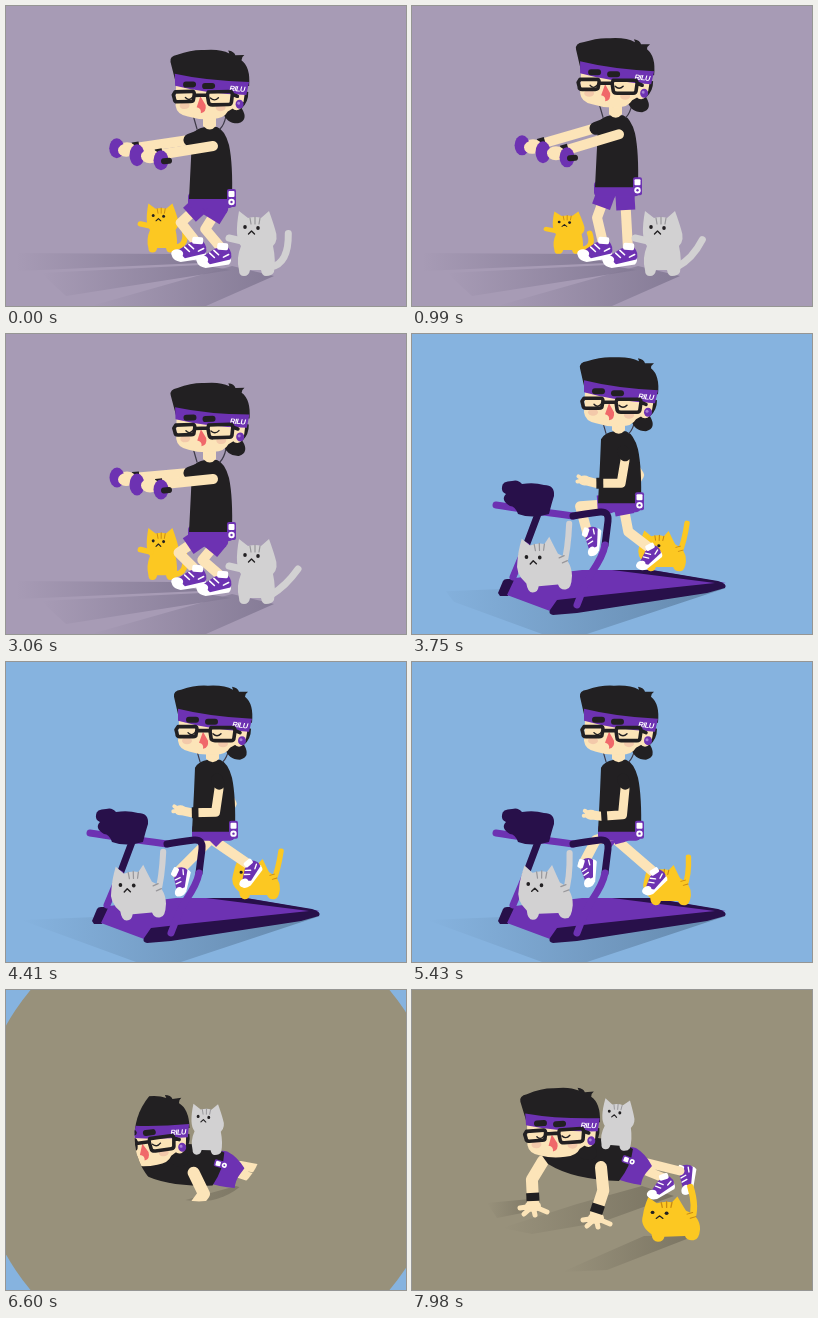
An HTML page that plays this animation: 400x300 px, repeating every 8 s.

```html
<!DOCTYPE html>
<html lang="en">
<head>
<meta charset="utf-8">
<title>Workout</title>
<style>
html, body { margin: 0; width: 100%; height: 100%; overflow: hidden; background: #a79bb5; }
svg { display: block; width: 100%; height: 100%; }
text { font: italic bold 7.5px "Liberation Sans", Arial, sans-serif; letter-spacing: -.5px; }
</style>
</head>
<body>
<svg id="stage" viewBox="0 0 400 300">
  <defs>
    <linearGradient id="g0"><stop offset="0" stop-color="#857b96" stop-opacity="0"/><stop offset="1" stop-color="#857b96"/></linearGradient>
    <linearGradient id="g1"><stop offset="0" stop-color="#6488ac" stop-opacity="0"/><stop offset="1" stop-color="#6488ac"/></linearGradient>
    <linearGradient id="g2"><stop offset="0" stop-color="#7a7462" stop-opacity="0"/><stop offset="1" stop-color="#7a7462"/></linearGradient>
    <clipPath id="c1"><circle id="r1" cx="193" cy="147"/></clipPath>
    <clipPath id="c2"><circle id="r2" cx="193" cy="147"/></clipPath>
  </defs>
  <rect width="400" height="300" fill="#a79bb5"/>
  <g id="s0"></g>
  <circle id="b1" cx="204" cy="150" fill="#86b3df"/>
  <g id="s1" clip-path="url(#c1)"></g>
  <circle id="b2" cx="204" cy="150" fill="#98917b"/>
  <g id="s2" clip-path="url(#c2)"></g>
</svg>
<script>
const SKIN = '#fce4b8', INK = '#222022', PURPLE = '#6d32b2', DARK = '#28104a',
      GREY = '#d2d1d2', GOLD = '#fcc822', WHITE = '#fff';
const LOOP = 8000, SPEED = 0.86, REVEAL = 197, STARTS = [0, 3329, 6329];
const $ = id => document.getElementById(id);
const TAU = Math.PI * 2;
const wave = u => Math.cos(u * TAU);

const fill = (d, c) => `<path d="${d}" fill="${c}"/>`;
const line = (d, c, w, cap = 'round') =>
  `<path d="${d}" fill="none" stroke="${c}" stroke-width="${w}" stroke-linecap="${cap}" stroke-linejoin="round"/>`;
const oval = (x, y, rx, ry, c) => `<ellipse cx="${x}" cy="${y}" rx="${rx}" ry="${ry}" fill="${c}"/>`;
const box = (x, y, w, h, r, c) => `<rect x="${x}" y="${y}" width="${w}" height="${h}" rx="${r}" fill="${c}"/>`;
const put = (x, y, body, rot = 0, sx = 1, sy = sx) =>
  `<g transform="translate(${x} ${y}) rotate(${rot}) scale(${sx} ${sy})">${body}</g>`;
const mix = (a, b, k) => [a[0] + (b[0] - a[0]) * k, a[1] + (b[1] - a[1]) * k];
const seg = (a, b) => `M${a}L${b}`;
const shade = (id, ...polys) => polys.map(p => fill(`M${p}Z`, `url(#g${id})`)).join('');

// Middle joint of a two-part limb; side picks the bending direction.
function joint(a, b, l1, l2, side) {
  const dx = b[0] - a[0], dy = b[1] - a[1], d = Math.hypot(dx, dy);
  const m = d >= l1 + l2 ? d * l1 / (l1 + l2) : (d * d + l1 * l1 - l2 * l2) / (2 * d);
  const h = Math.sqrt(Math.max(0, l1 * l1 - m * m)) * side * (d < l1 + l2);
  return [a[0] + (dx * m - dy * h) / d, a[1] + (dy * m + dx * h) / d];
}

const HEAD = [
  fill('M34-8L41-6Q41 4 34 10Q41 22 30 25Q18 25 15 13Z', INK),
  fill('M-31-14L-32 6Q-31 15-20 17Q-8 21 5 20Q16 20 20 13L36 4L38-8Z', SKIN),
  fill('M-31-16L-36-38Q-37-44-29-45Q-14-50-2-49Q14-50 23-45L22-48Q28-47 29-43L38-43Q35-41 35-38Q44-31 42-12Z', INK),
  fill('M-32-26Q0-18 42-16L39-3Q0-5-32-14Z', PURPLE),
  `<text x="30" y="-7" text-anchor="middle" fill="#fff" transform="rotate(6 30 -9)">RILU</text>`,
  oval(29, 4, 6.5, 8, SKIN), oval(32, 6, 4, 4.5, PURPLE), oval(31, 5, 1.5, 1.5, '#a77fd6'),
  oval(-23, 6, 5, 3.5, '#f3c9aa'), oval(13, 9, 5, 3.5, '#f3c9aa'),
  fill('M-7-3L-11 8Q-6 9-7 14Q-1 13-2 6Z', '#f0686a'),
  box(-24, -18, 13, 6, 3, INK), box(-5, -16, 13, 6, 3, INK),
  line('M-22-2q3.5 4 7 0M3-1q4 4 8 0', INK, 1.4),
  line('M-32-8H-15Q-13-8-13-5L-14 0Q-14 2-17 2H-30Q-33 2-33-1L-34-5ZM1-7H22Q25-7 25-4L24 3Q24 6 21 6H5Q1 6 1 3L0-4ZM-13-4H0M25-4L30-2', INK, 3.6)
].join('');

const SHOE = [
  fill('M-24 10Q-26 19-15 20L8 15Q11 12 9 7Z', WHITE),
  fill('M-19 9L-7 0L5-3Q12 4 9 10L-11 16Z', PURPLE),
  oval(-19, 12, 6, 4.5, WHITE), box(-5, -6, 11, 7, 2, WHITE),
  line('M-12 5l5 4M-8 2l5 4M2 8l5-3', WHITE, 1.6)
].join('');

const PLAYER = box(-4, -9, 9, 18, 2, PURPLE) + box(-2.5, -7, 6, 6, 1, WHITE) +
  oval(.5, 4, 3.2, 3.2, WHITE) + oval(.5, 4, 1.2, 1.2, PURPLE);

const face = (x, y, w) => oval(x, y, 1.8, 2, INK) + oval(x + w, y + 1, 1.8, 2, INK) +
  line(`M${x + w / 2 - 3} ${y + 7}l3-3l3 3`, INK, 1.4);

const stripes = (x, y, c) => line(`M${x} ${y}l1 6M${x + 5} ${y - 1}v7M${x + 10} ${y}l-1 6`, c, 1.2);
const mark = c => c === GREY ? '#98979b' : '#c98a12';

function standCat(c, tail, arm = true) {
  return (tail ? line(tail, c, 7) : '') +
    fill('M-17-65L-8-58Q0-60 5-58L13-65Q17-54 19-47Q23-36 17-30Q20-16 18-4Q16 0 10 0Q6 0 5-6H-6Q-7 0-12 0Q-17 0-17-6Q-20-18-15-30Q-22-38-17-65Z', c) +
    (arm ? line('M-14-35L-27-38', c, 7) : '') + stripes(-6, -58, mark(c)) + face(-11, -49, 13);
}

function walkCat(c, sway) {
  return line(`M18-24Q23-40 ${23 + sway}-65`, c, 6) +
    fill('M-22-52L-14-45Q-6-48 0-46L5-53Q10-42 13-36Q26-30 26-14Q25-1 20-1Q14 0 12-6L-7-5Q-8 1-13 1Q-18 1-19-8Q-30-18-27-30Q-26-40-22-52Z', c) +
    stripes(-10, -46, mark(c)) + line('M14-32l5-2M17-27l5-2', mark(c), 1.2) + face(-18, -34, 13);
}

function leg(hip, foot, knee, rot, size, cuff) {
  return line(`M${hip}L${knee}L${foot}`, SKIN, 10) + line(seg(hip, hip), PURPLE, 19) +
    line(seg(hip, mix(hip, knee, cuff)), PURPLE, 19, 'butt') + put(...foot, SHOE, rot, size);
}

function arm(shoulder, hand) {
  return line(seg(shoulder, hand), SKIN, 10) +
    line(seg(mix(shoulder, hand, .8), mix(shoulder, hand, .91)), INK, 12, 'butt') +
    oval(...hand, 9, 7, SKIN);
}

const TORSO = fill('M186 116Q190 109 199 108H211Q219 111 223 126Q227 145 226 180H183L185 140Z', INK) +
  fill('M197 92H210V107Q204 114 197 107Z', SKIN) +
  line('M187 96L191 110M220 97Q218 106 214 110', '#3f3b49', 1.2);

function squat(t) {
  const k = (1 + wave((t + 140) / 800)) / 2, d = 18 * k, a = 4.5 * k;
  const legs = [[[194, 186 + d], [191, 237]], [[213, 188 + d], [216, 243]]]
    .map(([h, f]) => leg(h, f, joint(h, f, 26, 26, 1), 4, 1, .55)).join('');
  const s = (1 + wave((t - 3060) / 2330)) / 2;
  const tail = `M15-9Q${34 - 4 * s} ${-10 - 8 * s} ${28 + 14 * s} ${-46 + 11 * s}`;
  return shade(0, '10,247 168,248 195,257 12,265', '35,267 195,259 225,264 60,290', '85,300 226,260 268,270 200,300') +
    put(156, 248 - 2 * k, standCat(GOLD, `M15-7Q34-8 27-${32 + 4 * k}`), 0, .8, .64 + .16 * k) +
    arm([183, 121 + d], [121, 140 + a]) +
    oval(110 + k, 139 + a, 7.5, 10, PURPLE) + oval(120, 141 + a, 8, 6.5, SKIN) +
    legs +
    put(0, d, box(182, 174, 45, 15, 4, PURPLE) + line('M192 118L184 121', INK, 13) + TORSO + put(225, 179, PLAYER)) +
    put(200 + 2 * k, 80 + 18 * k, HEAD, -2 * k) +
    oval(131, 146 + a, 7.5, 11, PURPLE) +
    arm([207, 127 + d], [144, 147 + a]) +
    oval(155, 151 + a, 7.5, 10, PURPLE) + line(`M158 ${152 + a}l5-.5`, INK, 6) +
    put(250, 270, standCat(GREY, tail));
}

const DECK = fill('M86 259L91 247Q92 245 95 245H103L96 262H88Z', DARK) +
  fill('M95 261L103 244L170 236H240L314 249L146 267L138 277Z', PURPLE) +
  fill('M200 236H240L306 247Q316 250 313 254L295 259L165 279L141 281Q136 280 138 276L145 266L180 262L303 249Z', DARK);

const RAILS = line('M126 180L114 212', DARK, 7) + line('M114 212L101 243', PURPLE, 7) +
  line('M84 171Q110 175 161 182', PURPLE, 7) +
  line('M161 182Q172 180 188 178Q197 177 196 187L193 211', DARK, 7) +
  line('M193 211Q191 222 180 238Q172 252 165 271', PURPLE, 7) +
  fill('M90 153Q90 147 100 147Q106 145 110 150Q122 148 132 151Q143 151 142 162Q140 168 137 180Q120 185 106 180Q103 172 98 172Q88 166 94 160Q89 158 90 153Z', DARK);

function run(t) {
  const u = (t - 4410) / 486 - .05, swing = (1 + Math.sin(u * TAU) / .62) / 2;
  const bob = .8 * wave(2 * u), prowl = (1 - wave((t - 4410) / 680)) / 2;
  const step = (v, x) => {
    const lift = Math.sin(v * TAU);
    const hip = [x, 170 + bob], foot = [207 + 38 * wave(v), 207 + 14 * lift];
    return leg(hip, foot, joint(hip, foot, 28, 28, 1), -57 + 17 * wave(v) + 30 * Math.max(0, lift), .83, .38);
  };
  const elbow = [209 + 2 * swing, 149 + 5 * swing];
  const wrist = mix([184, 149], [191, 156], swing), hand = mix([172, 146], [181, 155], swing);
  const back = mix([228, 141], [221, 143], swing);
  return shade(1, '15,258 90,255 140,276 314,254 175,300 130,300') + DECK +
    put(250 + 5 * prowl, 237 + 6 * prowl, walkCat(GOLD, 2 - 4 * prowl), 3, .9, .76) +
    step(u, 196) +
    line(`M216 ${122 + bob}L${back}L218 158`, SKIN, 9) +
    step(u + .5, 211) +
    put(3, -11 + bob, box(183, 172, 43, 17, 5, PURPLE) + TORSO + put(224, 178, PLAYER)) +
    put(204, 72 + bob, HEAD) +
    line(`M213 ${126 + bob}L${elbow}L${wrist}L${hand}`, SKIN, 9) +
    line(seg(wrist, mix(wrist, elbow, .28)), INK, 11, 'butt') +
    oval(...hand, 6, 5, SKIN) + line(`M${hand}l-6-4M${hand}l-7 1`, SKIN, 4) +
    line(`M211 ${117 + bob}L213 ${121 + bob}`, INK, 12) +
    RAILS +
    put(134, 257, walkCat(GREY, 2 - 3 * prowl), -2 + 3 * prowl, 1.02);
}

const palm = (x, y) => oval(x, y, 8, 6, SKIN) +
  line(`M${x} ${y}l-13 2M${x} ${y}l-9 8M${x} ${y}l2 9M${x} ${y}l14 6`, SKIN, 5);

function pushUp(t) {
  const at = v => 11 * wave((v - 6600) / 800 + .05), e = at(t) - at(7980);
  const turn = -.45 * e, r = turn * Math.PI / 180;
  const spin = (x, y) => [272 + (x - 272) * Math.cos(r) - (y - 200) * Math.sin(r),
                          200 + (x - 272) * Math.sin(r) + (y - 200) * Math.cos(r)];
  const limb = (sh, hand, len, side) => {
    const a = spin(...sh), j = joint(a, hand, len, len, side);
    return palm(hand[0], hand[1] + 5) + line(`M${a}L${j}L${hand}`, SKIN, 12) +
      line(seg(mix(j, hand, .62), hand), INK, 13, 'butt');
  };
  const body = line('M236 173L268 181M232 180L252 188', SKIN, 9) +
    fill('M206 160Q216 155 224 158Q234 164 240 176L234 183Q230 188 229 195Q214 193 200 187Z', PURPLE) +
    fill('M126 160Q140 152 186 148Q208 150 221 159Q219 176 207 191Q162 190 136 174Z', INK) +
    put(217, 171, PLAYER, -70, .8) +
    put(203, 160, standCat(GREY, '', false), 5, .82, .78) + put(147, 147, HEAD, -4);
  return shade(2, '75,213 118,209 130,219 85,228', '90,238 165,214 230,196 262,206 190,232 120,244', '150,282 232,246 285,245 195,280') +
    limb([131, 171], [121, 211], 21.5, 1) +
    put(270, 181, SHOE, -68, .85) +
    `<g transform="rotate(${turn} 272 200)">${body}</g>` +
    put(252, 189, SHOE, -18, .85) +
    limb([189, 177], [184, 223], 23.6, -1) +
    put(260, 251, walkCat(GOLD, -8 + 2 * wave(t / 800)), 0, 1.08, .84);
}

const SCENES = [squat, run, pushUp];

function draw(t) {
  SCENES.forEach((scene, i) => {
    const age = t - STARTS[i], over = i < 2 && t > STARTS[i + 1] + 320;
    $('s' + i).innerHTML = age < 0 || over ? '' : scene(t);
    if (!i) return;
    $('b' + i).setAttribute('r', Math.min(600, Math.max(0, age * SPEED)));
    $('r' + i).setAttribute('r', Math.min(600, Math.max(0, (age - REVEAL) * SPEED)));
  });
}

const origin = performance.now();
function tick() {
  draw((performance.now() - origin) % LOOP);
  requestAnimationFrame(tick);
}
tick();
</script>
</body>
</html>
```
